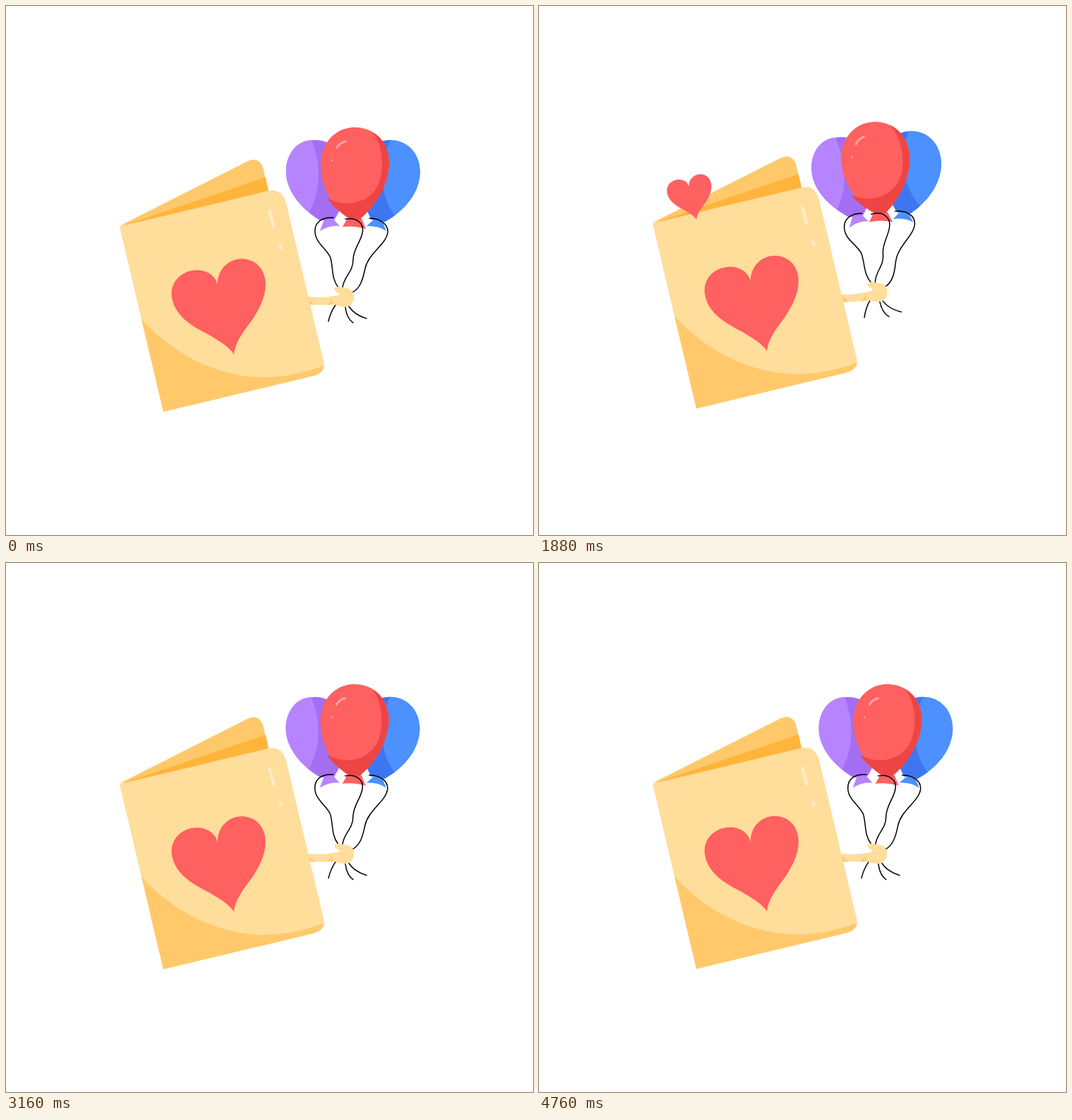
An HTML page for the animation above (4.8 s loop, 747x750 px).

```html
<!DOCTYPE html>
<html lang="en">
<head>
<meta charset="utf-8">
<title>Card with balloons</title>
<style>
html, body { margin: 0; width: 100%; height: 100%; overflow: hidden; background: #fff; }
svg { display: block; width: 100vw; height: 100vh; }
.string { fill: none; stroke: #000; stroke-width: 1.5; stroke-linecap: round; }
.shine { fill: none; stroke: #ffecc6; stroke-width: 4.5; }
</style>
</head>
<body>
<svg viewBox="0 0 747 750" xmlns="http://www.w3.org/2000/svg">
  <defs>
    <path id="heart" fill="#ff6060" d="M300 396C297 381 282 373 266 375C246 377 232 394 235 413C239 438 260 452 281 463C303 475 317 484 323 494C325 477 335 464 347 448C361 428 371 406 367 386C363 366 346 357 330 359C312 361 299 377 300 396Z"/>
  </defs>

  <g id="arm">
    <g id="purple">
      <path fill="#a46ef2" d="M397 235C397 208 415 190 439 190C464 190 484 212 484 243C484 268 475 288 465 304L445 304C418 287 397 262 397 235Z"/>
      <path fill="#b784ff" d="M397 235C397 208 413 191 433 190C446 220 448 258 430 292C411 277 397 256 397 235Z"/>
      <path fill="#b784ff" d="M451 303L445 319Q459 310 473 312L464 302Z"/>
      <path class="string" d="M464 300C450 299 438 305 438 319C438 336 455 344 460 357C464 372 461 386 471 399M486 426Q494 438 511 443"/>
    </g>
    <g id="red">
      <path fill="#4d90ff" d="M587 235C587 209 569 190 545 190C518 190 500 214 501 243C502 268 510 288 518 303L537 306C565 291 587 264 587 235Z"/>
      <path fill="#3d76ee" d="M545 190C529 220 528 268 551 297L537 306L518 303C510 288 502 268 501 243C500 214 518 190 545 190Z"/>
      <path fill="#4d90ff" d="M520 304L511 312Q527 311 539 319L533 304Z"/>
      <path fill="#ff6060" d="M484 301L477 313Q494 311 510 316L504 301Z"/>
      <path fill="#ff6060" d="M446 226C446 193 468 172 494 172C522 172 543 193 543 222C543 255 521 287 500 303L487 302C464 287 446 258 446 226Z"/>
      <path fill="#ef4444" d="M520 179C535 188 543 205 543 222C543 255 521 287 500 303L487 302C474 293 462 283 455 272C480 287 513 280 526 256C537 235 535 200 520 179Z"/>
      <path fill="none" stroke="#ffa3a3" stroke-width="3" stroke-linecap="round" d="M469 201Q473 194 481 192"/>
      <circle cx="462" cy="219" r="1.3" fill="#ffa3a3"/>
      <path class="string" d="M481 302C498 299 508 309 505 322C502 336 492 345 492 360C492 377 479 383 477 399M515 301C530 301 542 309 541 321C539 338 514 350 509 372C506 387 502 402 489 407M467 424Q460 434 457 447M481 427Q483 443 492 449"/>
    </g>
    <path fill="#ffdd9b" d="M385 405C405 409 415 411 429 412C442 414 454 413 467 411L467 423C450 424 440 424 429 423C415 421 400 418 385 414Z"/>
    <path fill="#ffc96b" d="M429 415L437 424L429 423ZM464 412Q461 420 454 424L466 423Z"/>
    <path fill="#ffdd9b" d="M466 400C470 396 477 399 482 400C490 401 494 407 493 413C493 420 489 425 482 426C476 427 468 425 464 422C461 421 462 415 465 411C470 411 475 409 472 407C468 406 464 402 466 400Z"/>
  </g>

  <g id="card">
    <path fill="#ffc96b" d="M161 312L342 220.500Q357 213 364 228L372 264Z"/>
    <path fill="#ffb53c" d="M161 313L368 243L372.500 264Z"/>
    <path fill="#ffdd9b" d="M161 313L371 262.500Q391 258 397 279L450 503C453 514 447 522 434 525L223 575.500Z"/>
    <path fill="#ffc96b" d="M192 444C237 495 303 527 366 526.500C397 526.500 425 520 450.500 510C451 517 445 522 434 525L223 575.500Z"/>
    <path class="shine" d="M373 289L380 315M388 337L390.500 345"/>
    <use href="#heart"/>
    <g id="sparkles" fill="#fff">
      <path d="M0 -6Q.8 -.8 6 0Q.8 .8 0 6Q-.8 .8 -6 0Q-.8 -.8 0 -6Z"/>
      <path d="M0 -10L.9 -.9L10 0L.9 .9L0 10L-.9 .9L-10 0L-.9 -.9Z"/>
    </g>
  </g>
  <g id="hearts"></g>
</svg>
<script>
const LOOP = 4800, BEAT = 800, LEAD = 40, FLIGHT = 1140;
const $ = id => document.getElementById(id);
const sine = p => (1 - Math.cos(Math.PI * p)) / 2;
const move = (el, value) => el.setAttribute('transform', value);

// Eases through evenly spaced values; the last one closes the cycle.
function wave(values, step, t) {
  const count = values.length - 1;
  const pos = t / step % count, i = Math.floor(pos);
  return values[i] + (values[i + 1] - values[i]) * sine(pos - i);
}

const bob = [0, -21, 3.5, -20.5, 0.5, -20.5, 0];
const armSwing = [0, -5.7, 5.2, -5.7, 0];
const redSwing = [0, 5.2, -4.3, 5.2, 0, 5.2, 0];
const purpleSwing = [0, -5.1, 4, -5.1, 0, -5.1, 0];

const flights = [
  { start: 600, from: 373, to: 146, size: 0.83 },
  { start: 1355, from: 398, to: 122, size: 0.635 },
  { start: 1997, from: 360, to: 140, size: 0.37 }
];
for (const f of flights) {
  f.el = $('card').querySelector('use').cloneNode();
  $('hearts').append(f.el);
}

// Pops out, then drifts up and to the left while shrinking.
function fly({ el, start, from, to, size }, t) {
  const p = (t - start) / FLIGHT;
  el.setAttribute('display', p > 0 && p < 1 ? 'inline' : 'none');
  const scale = size * (1 - 0.55 * p) * Math.min(1, p / 0.075);
  move(el, `translate(${285 - 156 * p} ${from + (to - from) * p}) scale(${scale}) translate(-301.5 -426.5)`);
}

const [small, large] = $('sparkles').children;

function draw(t) {
  const beat = t + LEAD;
  const swing = (id, values) => move($(id), `rotate(${wave(values, BEAT, beat)} 479 412)`);
  move($('card'), `translate(0 ${wave(bob, BEAT, beat)})`);
  move($('arm'), `rotate(${wave(armSwing, BEAT / 2, t)} 389 400)`);
  swing('red', redSwing);
  swing('purple', purpleSwing);
  flights.forEach(f => fly(f, t));

  const glow = sine(Math.max(0, 1 - Math.abs(t - 3760) / 280));
  move(small, `translate(224.5 394.5) scale(${glow})`);
  move(large, `translate(320 426.5) scale(${glow})`);
}

const start = performance.now();
function tick(now) {
  draw(Math.max(0, now - start) % LOOP);
  requestAnimationFrame(tick);
}
draw(0);
requestAnimationFrame(tick);
</script>
</body>
</html>
```
